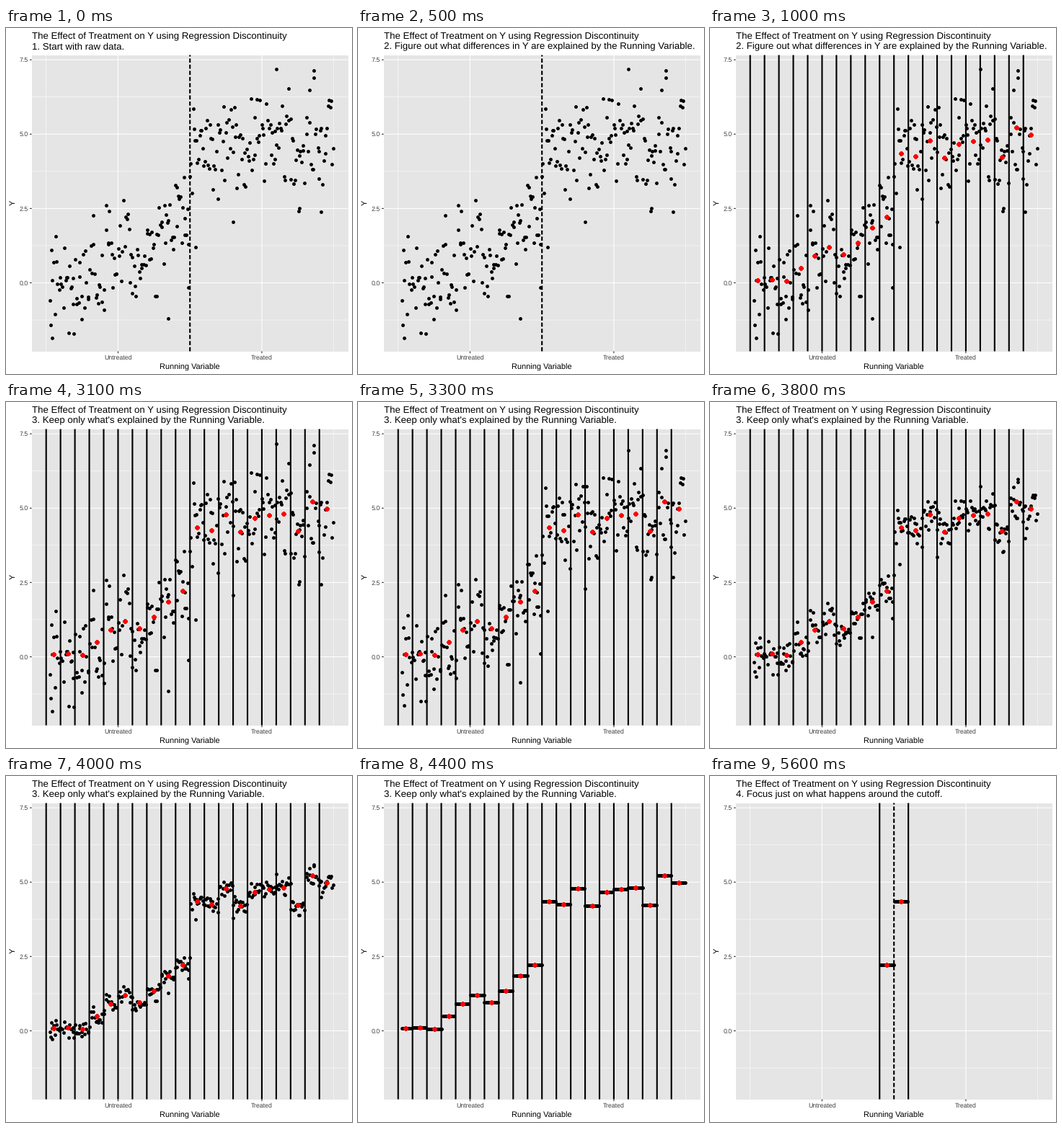
A matplotlib script for the animation above (8000 ms loop, 480 by 480 pixels).

```python
import numpy as np
import matplotlib.pyplot as plt
from matplotlib.animation import FuncAnimation
from matplotlib.patches import Rectangle

SIZE, STEP_MS, LOOP_MS = 480, 100, 8000
LEFT, RIGHT, TOP, BOTTOM = 35.7, 474.5, 37.5, 448.5
FIRST_EDGE, BIN_WIDTH, BINS = 55.7, 19.95, 20
CUTOFF = FIRST_EDGE + 10 * BIN_WIDTH
BINNED_AT, MOVE_AT, FOCUS_AT, MOVE_STEPS = 1000, 3100, 5600, 14
SUBTITLES = {
    0: "1. Start with raw data.",
    500: "2. Figure out what differences in Y are explained by the Running Variable.",
    MOVE_AT: "3. Keep only what's explained by the Running Variable.",
    FOCUS_AT: "4. Focus just on what happens around the cutoff.",
}

plt.rcParams.update({"font.family": "Liberation Sans", "text.hinting": "none"})


def y_pixel(value):
    return 353.5 - 41.25 * value


def x_pixel(bins):
    return FIRST_EDGE + BIN_WIDTH * bins


# Average Y in each bin; positions along x are measured in bins.
means = np.array([0.08, 0.11, 0.06, 0.49, 0.90, 1.19, 0.96, 1.34, 1.86, 2.21,
                  4.34, 4.25, 4.79, 4.20, 4.66, 4.77, 4.82, 4.22, 5.22, 4.99])
outliers = [(0.4, -1.85), (1.9, -1.7), (8.5, -1.2), (9.9, -0.15), (10.4, 1.2),
            (13.0, 2.05), (16.0, 7.2), (17.6, 2.5), (18.6, 7.15), (19.1, 2.4)]


def make_data(count=270):
    rng = np.random.default_rng(5)
    x = 0.2 + 19.8 * (np.arange(count) + rng.random(count)) / count
    y = means[x.astype(int)] + np.clip(rng.normal(0, 0.85, count), -1.8, 1.8)
    return np.vstack([np.column_stack([x, y]), outliers]).T


x_data, y_data = make_data()
bin_of = x_data.astype(int)
near_cutoff = (bin_of == 9) | (bin_of == 10)
mean_points = np.column_stack([x_pixel(np.arange(BINS) + 0.5), y_pixel(means)])

fig = plt.figure(figsize=(SIZE / 72, SIZE / 72), dpi=72, facecolor="white")
ax = fig.add_axes([0, 0, 1, 1])
ax.set(xlim=(0, SIZE), ylim=(SIZE, 0))
ax.axis("off")
ax.add_patch(Rectangle((LEFT, TOP), RIGHT - LEFT, BOTTOM - TOP, fc="#e5e5e5", lw=0))


def line(xs, ys, color, width, **style):
    return ax.plot(xs, ys, color=color, lw=width, snap=False,
                   solid_capstyle="butt", dash_capstyle="butt", **style)[0]


def cut(x, **style):
    return line([x, x], [BOTTOM, TOP], "black", 2.13, zorder=4, **style)


def label(x, y, text, size, color="black", **style):
    return ax.text(x, y, text, fontsize=size, color=color,
                   **{"va": "baseline", **style})


def grid_width(k):
    return 1.07 if k % 2 else 0.53


for k, value in enumerate(np.arange(-1.25, 7.6, 1.25)):
    y = y_pixel(value)
    line([LEFT, RIGHT], [y, y], "white", grid_width(k))
    if k % 2:
        line([LEFT - 2.7, LEFT], [y, y], "#2a2a2a", 1.07)
        label(30.8, y + 3.1, f"{value:.1f}", 8.8, "#404040", ha="right")
for k, name in enumerate(["", "Untreated", "", "Treated", ""]):
    x = x_pixel(5 * k)
    line([x, x], [TOP, BOTTOM], "white", grid_width(k))
    if name:
        line([x, x], [BOTTOM, BOTTOM + 2.7], "#2a2a2a", 1.07)
        label(x, 460.4, name, 8.8, "#404040", ha="center")

label(CUTOFF, 473.6, "Running Variable", 11, ha="center")
label(10.4, 242.5, "Y", 11, ha="center", va="center", rotation=90)
label(35.5, 15.3, "The Effect of Treatment on Y using Regression Discontinuity", 13.2)
subtitle = label(35.5, 29.7, "", 13.2)

dots = ax.scatter([], [], s=4.9 ** 2, c="black", lw=0, zorder=3)
dashed = cut(CUTOFF, ls=(0, (2.7, 1.3)))
bin_lines = [cut(x_pixel(i)) for i in range(BINS)]
reds = ax.scatter([], [], s=5.8 ** 2, c="red", lw=0, zorder=5)


def draw(frame):
    now = frame * STEP_MS
    binned, focus = now >= BINNED_AT, now >= FOCUS_AT
    subtitle.set_text(SUBTITLES[max(start for start in SUBTITLES if start <= now)])

    t = np.clip((now - MOVE_AT) / STEP_MS + 1, 0, MOVE_STEPS) / MOVE_STEPS
    eased = (1 - np.cos(np.pi * t)) / 2
    y = y_data + (means[bin_of] - y_data) * eased
    moved = np.column_stack([x_pixel(x_data), y_pixel(y)])
    dots.set_offsets(moved[near_cutoff] if focus else moved)

    # Each mean is stacked once per observation, which hardens its edge.
    shown = mean_points[9:11] if focus else mean_points
    reds.set_offsets(np.tile(shown, (12, 1)))
    reds.set_visible(binned)
    dashed.set_visible(focus or not binned)
    for i, edge in enumerate(bin_lines):
        edge.set_visible(i in (9, 11) if focus else binned)
    return [subtitle, dots, reds, dashed, *bin_lines]


anim = FuncAnimation(fig, draw, frames=LOOP_MS // STEP_MS, interval=STEP_MS,
                     repeat=True, repeat_delay=0, blit=False)
plt.show()
```
